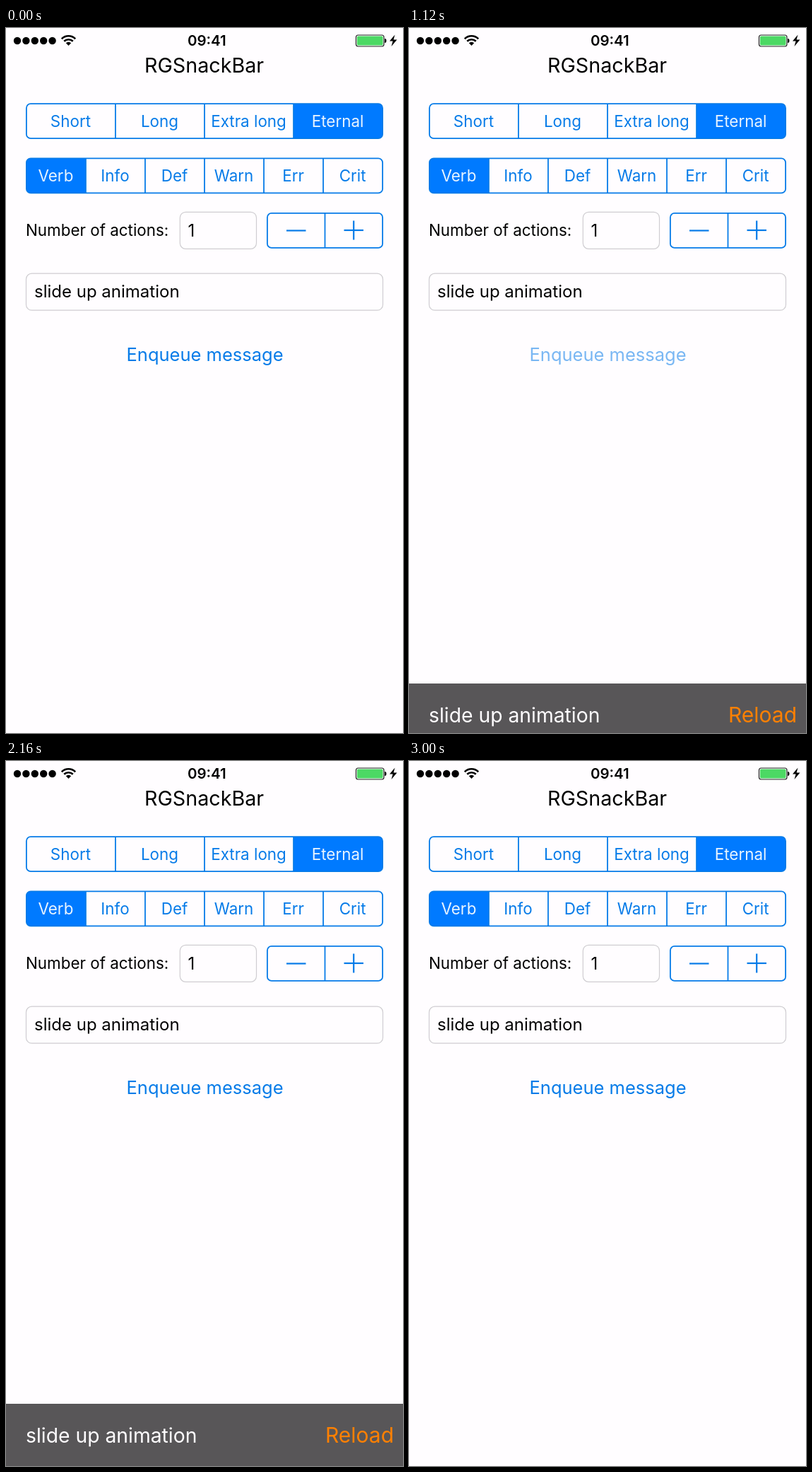
Recreate the animation shown at these times as an HTML page with a canvas. Size 562 px wide and 997 px high, loop 3.04 s.

```html
<!DOCTYPE html>
<html lang="en">
<head>
<meta charset="utf-8">
<title>Snack bar demo</title>
<style>
html, body { margin: 0; width: 100%; height: 100%; overflow: hidden; background: #fffdff; }
canvas { display: block; }
</style>
</head>
<body>
<canvas id="stage" width="562" height="997"></canvas>
<script>
const W = 562, H = 997, LOOP = 3040, TICK = 40;
const BLUE = '#007aff', TINT = '#067be8', PAPER = '#fffdff', GREY = '#cfcdd1';
const BAR_H = 88;
const ctx = document.getElementById('stage').getContext('2d');

function text(str, x, y, size, color, align = 'left', weight = 400) {
  ctx.font = `${weight} ${size}px Inter, "Open Sans", sans-serif`;
  ctx.fillStyle = color;
  ctx.textAlign = align;
  ctx.fillText(str, x, y);
}

function box(x, y, w, h, r, color, width) {
  ctx.beginPath();
  ctx.roundRect(x, y, w, h, r);
  ctx.strokeStyle = color;
  ctx.lineWidth = width;
  ctx.stroke();
}

function line(x1, y1, x2, y2, color = TINT, width = 1.8) {
  ctx.beginPath();
  ctx.moveTo(x1, y1);
  ctx.lineTo(x2, y2);
  ctx.strokeStyle = color;
  ctx.lineWidth = width;
  ctx.stroke();
}

function shape(points, color) {
  ctx.beginPath();
  points.forEach(([x, y]) => ctx.lineTo(x, y));
  ctx.fillStyle = color;
  ctx.fill();
}

function segments(y, h, labels, chosen) {
  const x = 28.9, w = 504.2, step = w / labels.length;
  ctx.save();
  ctx.beginPath();
  ctx.roundRect(x, y, w, h, 6);
  ctx.clip();
  ctx.fillStyle = BLUE;
  ctx.fillRect(x + chosen * step, y, step, h);
  ctx.restore();
  box(x, y, w, h, 6, TINT, 1.8);
  labels.forEach((label, i) => {
    const left = x + i * step;
    if (i) line(left, y, left, y + h);
    text(label, left + step / 2 - 0.5, y + 32.5, 22.4, i === chosen ? '#e8f4ff' : TINT, 'center');
  });
}

function statusBar() {
  ctx.fillStyle = '#000';
  for (let i = 0; i < 5; i++) {
    ctx.beginPath();
    ctx.arc(16 + i * 12.4, 18, 5.2, 0, Math.PI * 2);
    ctx.fill();
  }
  const cx = 88.5, cy = 25, a = Math.PI * 0.25;
  ctx.strokeStyle = '#000';
  ctx.lineWidth = 2.6;
  for (const r of [8.8, 13.7]) {
    ctx.beginPath();
    ctx.arc(cx, cy, r, -Math.PI + a, -a);
    ctx.stroke();
  }
  ctx.beginPath();
  ctx.moveTo(cx, cy);
  ctx.arc(cx, cy, 5.2, -Math.PI + a, -a);
  ctx.fillStyle = '#000';
  ctx.fill();

  text('09:41', 284.3, 25.4, 20.5, '#000', 'center', 600);

  box(495.5, 10, 39.5, 16, 3, '#222', 1.2);
  ctx.beginPath();
  ctx.roundRect(497, 11.5, 36.5, 13, 1.5);
  ctx.fillStyle = '#4cd964';
  ctx.fill();
  ctx.beginPath();
  ctx.roundRect(536.2, 15, 2.2, 6, [0, 2, 2, 0]);
  ctx.fillStyle = '#000';
  ctx.fill();
  shape([[550.5, 9.5], [543, 18.6], [547.6, 18.6], [545.5, 26], [553.5, 16.6], [548.6, 16.6]], '#000');
}

// Symmetric ease-in-out, close to the system curve.
function ease(p) {
  p = Math.min(1, Math.max(0, p));
  return p < 0.5 ? 2 * p * p : 1 - 2 * (1 - p) * (1 - p);
}

function buttonAlpha(t) {
  return t < 880 ? 1 : 0.2 + 0.8 * ease((t - 962) / 345);
}

function barTop(t) {
  const shown = ease((t - 950) / 250) - ease((t - 2418) / 250);
  return H - Math.round(BAR_H * shown);
}

function draw(t) {
  ctx.fillStyle = PAPER;
  ctx.fillRect(0, 0, W, H);
  statusBar();
  text('RGSnackBar', 280.5, 63, 28.7, '#000', 'center');
  segments(107.2, 49, ['Short', 'Long', 'Extra long', 'Eternal'], 3);
  segments(184.4, 49, ['Verb', 'Info', 'Def', 'Warn', 'Err', 'Crit'], 0);

  text('Number of actions:', 28, 294, 22.4, '#000');
  box(246.3, 260.3, 108.2, 52, 8, GREY, 1.2);
  text('1', 257.5, 294.5, 24, '#000');
  box(369.9, 261.9, 163.2, 49, 6, TINT, 1.8);
  line(451.5, 262, 451.5, 311);
  line(397, 286.5, 424.5, 286.5, TINT, 2.2);
  line(478.5, 286, 506, 286, TINT, 2.2);
  line(492.2, 272.5, 492.2, 299.5, TINT, 2.2);

  box(28.5, 347.2, 505, 52, 8, GREY, 1.2);
  text('slide up animation', 40, 381, 24, '#000');

  ctx.globalAlpha = buttonAlpha(t);
  text('Enqueue message', 281.5, 470.5, 25.5, TINT, 'center');
  ctx.globalAlpha = 1;

  const top = barTop(t);
  if (top < H) {
    ctx.fillStyle = '#585658';
    ctx.fillRect(0, top, W, BAR_H);
    text('slide up animation', 28, top + 54.5, 28.3, '#fffdff');
    text('Reload', 549, top + 55, 30, '#ff8000', 'right');
  }
}

function frame(now) {
  draw(Math.floor(now % LOOP / TICK) * TICK);
  requestAnimationFrame(frame);
}
draw(0);
requestAnimationFrame(frame);
</script>
</body>
</html>
```
